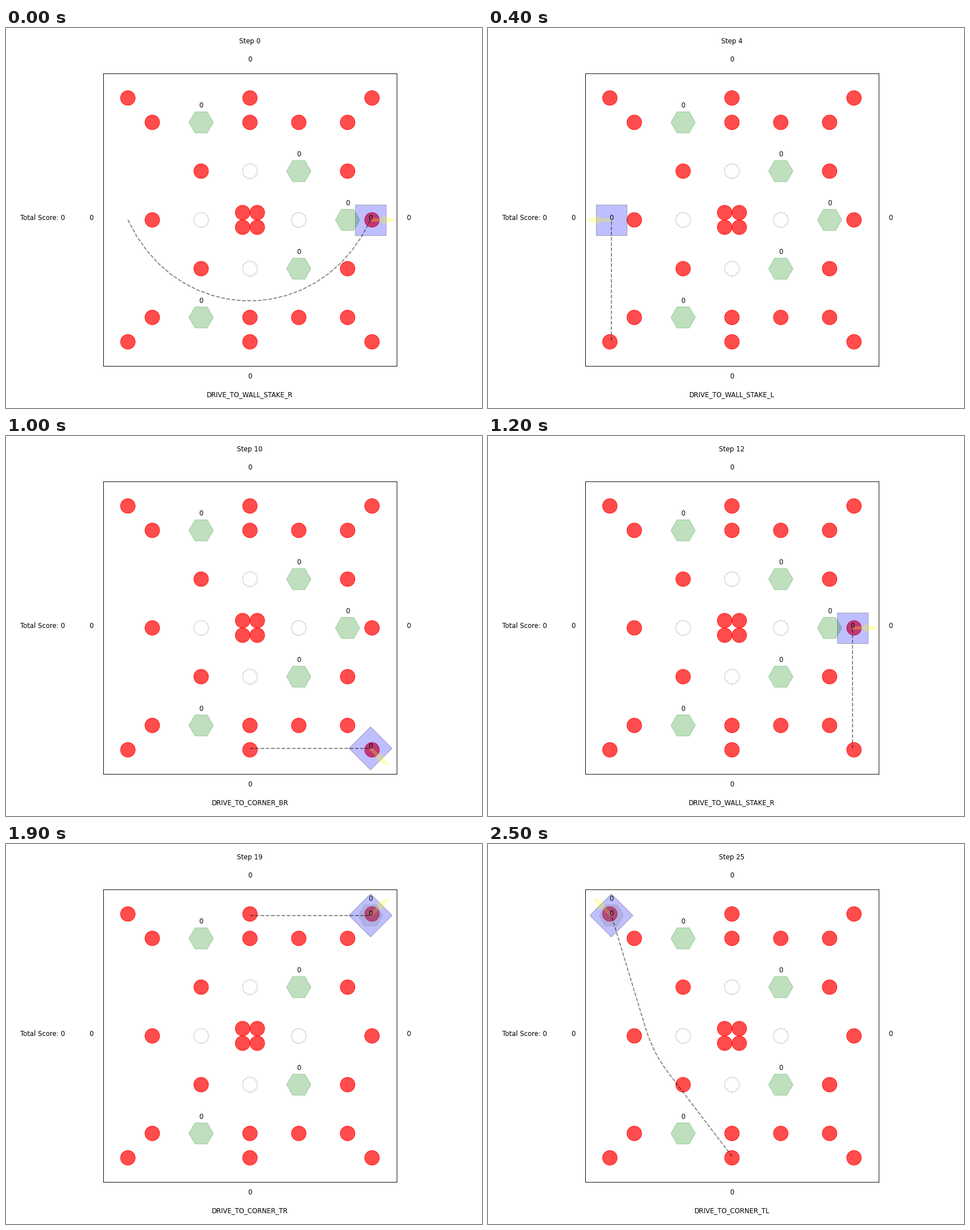
These frames come from a looping animation (837x669 px, 2600 ms). A matplotlib script:

```python
from itertools import product
from math import comb

import numpy as np
import matplotlib.pyplot as plt
from matplotlib.animation import FuncAnimation
from matplotlib.patches import Circle, Rectangle, RegularPolygon

W, H, DPI = 837, 669, 669 / 8
plt.rcParams["font.family"] = "DejaVu Sans"

# Positions are in feet on a 12 x 12 field; most are offsets from its centre.
CENTER = 6
REACH = 4.94  # how far from the centre the robot can drive
SIDES = (-1, 1)
PICK, ADD, DROP = "PICK_UP_NEXT_NEAREST_GOAL", "ADD_RING_TO_GOAL", "DROP_GOAL"
PLAN = (f"R BR B BL L BL {ADD} {DROP} B {ADD} BR {ADD} R "
        f"{PICK} {ADD} TR R TL T TR {ADD} BR B {ADD} {ADD} TL").split()

PICKED = (4, 0)
GOALS = [PICKED] + [spot for s in SIDES for spot in ((-2, 4 * s), (2, 2 * s))]
POSTS = [spot for s in SIDES for spot in ((2 * s, 0), (0, 2 * s))]
RINGS = [(-4, 0), (5, 0)]
for xs, y in (((-5, 0, 5), 5), ((-4, 0, 2, 4), 4), ((-2, 4), 2), ((-.3, .3), .3)):
    RINGS += [(x, s * y) for x, s in product(xs, SIDES)]


def spot(name):
    """Offset of a wall or corner from its letters, such as L or TR."""
    return REACH * np.array([("R" in name) - ("L" in name),
                             ("T" in name) - ("B" in name)])


def bezier(*controls, samples=20):
    t = np.linspace(0, 1, samples)[:, None]
    n = len(controls) - 1
    return sum(comb(n, k) * t**k * (1 - t)**(n - k) * np.array(c)
               for k, c in enumerate(controls))


def find_route(here, name, start, end):
    """Straight drive, unless it has to bend round the middle."""
    if (here, name) == ("L", "R"):
        return bezier((-5, 0), (-2.94, -4.43), (2.9, -4.43), end)
    if name == "TL" and here in ("B", "R"):
        corner = np.array((-3.23, -.69))
        legs = [corner + .18 * (spot(place) - corner) for place in ("B", "TL")]
        route = np.vstack([spot("B"), bezier(legs[0], corner, legs[1], samples=8), end])
        return route if here == "B" else -route[:, ::-1]
    return np.array([start, end])


def build_states():
    """Turn the plan into (label, position, heading, route, holding) per step."""
    states, here, position, heading, holding = [], "L", spot("L"), 180, False
    for action in PLAN:
        label, route, start = action, None, position
        if len(action) <= 2:
            label = f"DRIVE_TO_{'CORNER' if len(action) == 2 else 'WALL_STAKE'}_{action}"
            position = spot(action)
            heading = np.degrees(np.arctan2(position[1], position[0]))
            route = find_route(here, action, start, position)
            here = action
        elif action == PICK:
            position, heading, holding = np.array(PICKED), 180, True
            route = np.array([start, position])
        states.append((label, position, heading, route, holding))
    return states


STATES = build_states()
fig = plt.figure(figsize=((W + 1e-6) / DPI, (H + 1e-6) / DPI), dpi=DPI, facecolor="white")
ax = fig.add_subplot()


def write(x, y, text="0"):
    ax.text(x, y, text, ha="center", fontsize=10, color="black")


def draw_robot(x, y, heading, size=1.25):
    ax.add_patch(Rectangle((x - size / 2, y - size / 2), size, size, angle=heading,
                           rotation_point="center", facecolor="blue",
                           edgecolor="black", alpha=.25))
    a = np.radians(heading)
    ax.arrow(x, y, .5 * np.cos(a), .5 * np.sin(a), width=.1, head_width=.3,
             head_length=.5, color="yellow", alpha=.25)
    write(x, y)


def draw_goal(x, y, color):
    ax.add_patch(RegularPolygon((x, y), 6, radius=.5, orientation=np.pi / 6,
                                color=color, alpha=.25))
    write(x, y + .6)


def draw(step):
    label, position, heading, route, holding = STATES[step]
    ax.clear()
    ax.set(xlim=(-CENTER, CENTER), ylim=(-CENTER, CENTER), aspect="equal",
           xticks=[], yticks=[])

    for ring in RINGS:
        ax.add_patch(Circle(ring, .3, color="red", alpha=.7))
    for post in POSTS:
        ax.add_patch(Circle(post, .3, facecolor="none", edgecolor="black",
                            linestyle="dotted", alpha=.5))
    draw_robot(*position, heading)
    for goal in GOALS:
        if holding and goal == PICKED:
            draw_goal(*position, "grey")
        else:
            draw_goal(*goal, "green")
    if route is not None:
        ax.plot(*route.T, "k--", alpha=.5, linewidth=1.5)

    for s in SIDES:
        write(6.5 * s, 0)
        write(0, 6.5 * s)
    write(-8.5, 0, "Total Score: 0")
    write(0, 7.25, f"Step {step}")
    write(0, -7.25, label)
    return []


anim = FuncAnimation(fig, draw, frames=len(PLAN), init_func=lambda: draw(0),
                     interval=100, repeat=True, repeat_delay=0, blit=False)
plt.show()
```
